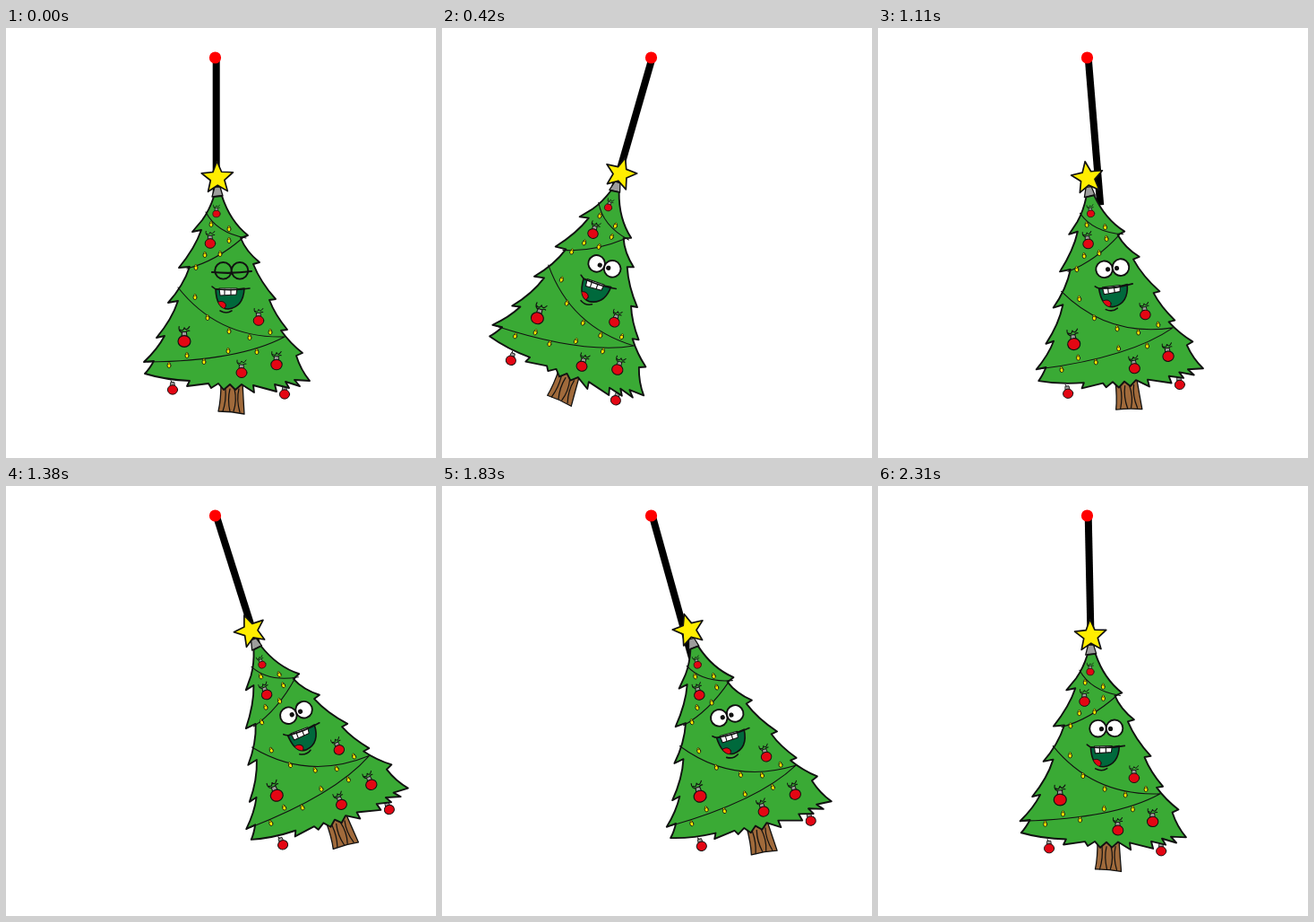
Recreate the animation shown at these times as an HTML page with a canvas. Size 480 px wide and 479 px high, loop 2.34 s.

```html
<!DOCTYPE html>
<html lang="en">
<head>
<meta charset="utf-8">
<title>Swinging tree</title>
<style>
html, body { margin: 0; width: 100%; height: 100%; overflow: hidden; background: #fff; }
canvas { display: block; }
</style>
</head>
<body>
<canvas id="stage" width="480" height="479"></canvas>
<script>
const ctx = document.getElementById('stage').getContext('2d');
const LOOP = 2340, STEP = 30, BLINK = 90;
const INK = '#111', GREEN = '#3aaa35', RED = '#e30613', YELLOW = '#ffed00', GREY = '#9d9d9c';
const STAR = { x: 236, y: 167 };
const PIVOT = { x: 234.2, y: 33 };

// Time, then degrees to the right: rope, tree tilt, tree position on its arc.
const swing = [
  [0, 0, 0, 0], [420, -16.1, -18.5, -15.9], [600, -19.5, -22, -19.3],
  [840, -12.9, -12.8, -15.1], [1110, 4.7, 6.8, -0.9], [1380, 17.6, 20.6, 16],
  [1500, 19.5, 23, 18.8], [1620, 19.2, 20.8, 19.5], [1830, 15.6, 15.3, 17.3],
  [2160, 6, 5.7, 6.6], [2310, 1.2, 0.9, 0.6]
];

function key(i) {
  const n = swing.length, k = swing[(i + n) % n];
  return [k[0] + Math.floor(i / n) * LOOP, ...k.slice(1)];
}

function tangent(i, c) {
  const a = key(i - 1), b = key(i), d = key(i + 1);
  const before = b[0] - a[0], after = d[0] - b[0];
  return ((b[c] - a[c]) / before * after + (d[c] - b[c]) / after * before) / (before + after);
}

// Smooth cubic through the poses, in radians.
function angle(t, c) {
  let i = swing.length - 1;
  while (swing[i][0] > t) i--;
  const a = key(i), b = key(i + 1), h = b[0] - a[0], u = (t - a[0]) / h, v = 1 - u;
  const deg = a[c] * v * v * (1 + 2 * u) + b[c] * u * u * (3 - 2 * u)
    + h * u * v * (tangent(i, c) * v - tangent(i + 1, c) * u);
  return deg * Math.PI / 180;
}

const outline = new Path2D(`M232 188 Q227 203 219 214 L208 227 L218 225 Q211 245 193 267
  L205 266 Q198 287 181 306 L192 304 Q185 325 168 345 L177 343 Q169 358 154 372
  L165 371 Q160 380 155 385 Q178 392 205 393 L202 399 L226 396 L229 401 L237 396
  L243 403 L250 397 L256 403 L263 397 L277 406 L276 398 L302 405 L300 397
  L316 401 L312 394 L328 399 L322 392 L339 393 Q329 381 324 365 L331 362
  Q317 351 307 337 L314 336 Q300 319 294 303 L301 302 Q284 283 276 263
  L283 261 Q268 249 262 234 L270 231 Q250 215 241 187 Z`);
const trunk = new Path2D('M240 395 Q240 414 237 427 Q252 427 266 430 Q265 414 264 395 Z');
const grain = new Path2D('M245 402 Q246 415 242 427 M250 402 Q247 414 250 427 M255 402 Q258 415 254 427 M260 402 Q257 414 261 428');
const garlands = new Path2D(`M223 205 Q235 228 268 234 M264 234 Q234 260 202 268
  M192 289 Q237 346 311 344 Q260 371 158 372`);
const cone = new Path2D('M233 177 L239 177 L242 187 L230 188 Z');
const mouth = new Path2D('M234 291 Q250 293 266 290 Q265 311 248 313 Q235 313 234 291 Z');
const teeth = new Path2D('M238 290 L258 290 L257 297 L239 298 Z');
const gaps = new Path2D('M244 291 L244 297 M251 291 L251 297');
const smile = new Path2D('M230 288 Q233 291 236 291 Q254 293 272 290 M239 315 Q246 319 252 315');

const bulbs = [
  [229, 219], [249, 224], [249, 237], [239, 252], [222, 253], [212, 267], [211, 300], [225, 323],
  [249, 338], [272, 345], [295, 339], [280, 361], [248, 360], [221, 372], [202, 365], [182, 376]
];
const baubles = [[235, 207, 4.2], [228, 240, 5.8], [282, 326, 5.8], [199, 349, 7], [263, 384, 6], [302, 375, 6.2]];
const hanging = [[186, 403, 5.6], [311, 408, 5.6]];

function paint(path, fill, line = 1.5) {
  if (fill) {
    ctx.fillStyle = fill;
    ctx.fill(path);
  }
  if (line) {
    ctx.strokeStyle = INK;
    ctx.lineWidth = line;
    ctx.stroke(path);
  }
}

function oval(x, y, rx, ry = rx) {
  const p = new Path2D();
  p.ellipse(x, y, rx, ry, 0, 0, Math.PI * 2);
  return p;
}

function starPath(x, y, outer, inner) {
  const p = new Path2D();
  for (let i = 0; i < 10; i++) {
    const r = i % 2 ? inner : outer, a = i * Math.PI / 5 - Math.PI / 2 - 0.03;
    p.lineTo(x + r * Math.cos(a), y + r * Math.sin(a));
  }
  p.closePath();
  return p;
}

function bauble([x, y, r], hook) {
  ctx.save();
  ctx.translate(x, y);
  ctx.scale(r / 6, r / 6);
  if (hook) paint(new Path2D('M-1 -8 Q-6 -9 -5 -14 M-4 -11 Q-1 -9 0 -13 Q2 -9 5 -14 M1 -8 Q3 -11 5 -10'), null, 1);
  else paint(new Path2D('M0 -7 L-2 -11'), null, 1);
  paint(new Path2D('M-2 -9 L2 -9 L2.5 -5 L-2.5 -5 Z'), GREY, 0.9);
  paint(oval(0, 0, 6, 5.5), RED, 1);
  ctx.restore();
}

function drawEyes(closed) {
  for (const x of [242.5, 261]) paint(oval(x, 270.3, 9.3), closed ? GREEN : '#fff', 1.9);
  if (closed) {
    paint(new Path2D('M230 272 Q252 274 274 271'), null, 2.2);
  } else {
    for (const x of [246.5, 256.5]) paint(oval(x, 270.8, 2.6), INK, 0);
  }
}

function drawTree(closed) {
  paint(trunk, '#a06a3b', 1.3);
  paint(grain, null, 1.2);
  hanging.forEach(b => bauble(b, false));
  paint(cone, GREY, 1.3);
  paint(outline, GREEN, 1.9);
  paint(garlands, null, 1.1);
  for (const [x, y] of bulbs) {
    paint(oval(x, y, 2, 2.6), YELLOW, 0.8);
    paint(oval(x, y - 2.6, 1.1), YELLOW, 0.6);
  }
  baubles.forEach(b => bauble(b, true));
  drawEyes(closed);
  paint(mouth, '#00693c', 1.6);
  ctx.save();
  ctx.clip(mouth);
  paint(oval(240, 309, 5.5, 4.5), RED, 0.9);
  ctx.restore();
  paint(teeth, '#fff', 1.1);
  paint(gaps, null, 1.1);
  paint(smile, null, 1.6);
  paint(starPath(STAR.x, STAR.y, 18.5, 8.2), YELLOW, 1.7);
}

function drawRope(a) {
  ctx.save();
  ctx.translate(PIVOT.x, PIVOT.y);
  ctx.rotate(-a);
  ctx.fillStyle = '#000';
  ctx.fillRect(-3.5, 0, 8, 165);
  ctx.restore();
}

function draw(t) {
  ctx.fillStyle = '#fff';
  ctx.fillRect(0, 0, 480, 479);
  ctx.lineJoin = 'round';
  ctx.lineCap = 'round';
  drawRope(angle(t, 1));

  const tilt = angle(t, 2), arc = angle(t, 3);
  const dx = STAR.x - PIVOT.x, dy = STAR.y - PIVOT.y;
  ctx.save();
  ctx.translate(PIVOT.x + dx * Math.cos(arc) + dy * Math.sin(arc),
                PIVOT.y - dx * Math.sin(arc) + dy * Math.cos(arc));
  ctx.rotate(-tilt);
  ctx.translate(-STAR.x, -STAR.y);
  drawTree(t < BLINK);
  ctx.restore();

  paint(oval(233.5, 33, 6.6), '#f00', 0);
}

const start = performance.now();
function tick() {
  const t = (performance.now() - start) % LOOP;
  draw(Math.floor(t / STEP) * STEP);
  requestAnimationFrame(tick);
}
tick();
</script>
</body>
</html>
```
